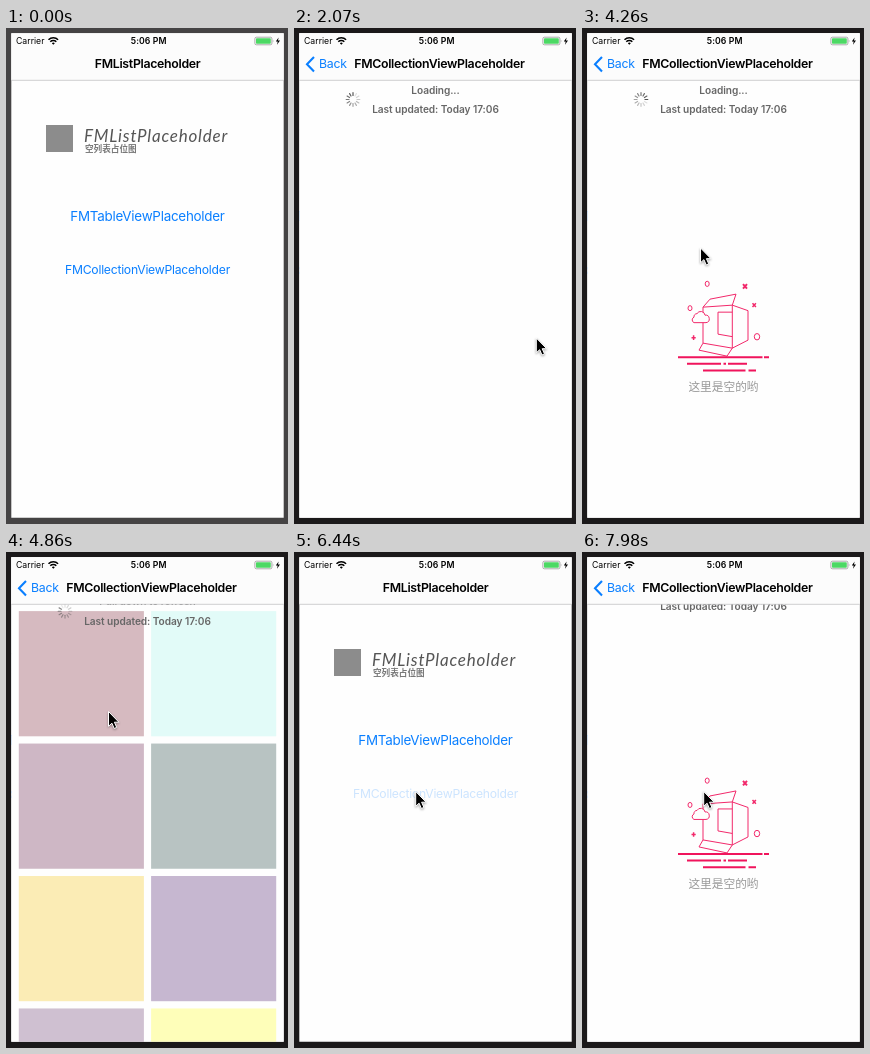
Animation of 282 by 496 pixels, one loop 8000 ms. Source, as an HTML page:

```html
<!DOCTYPE html>
<html lang="en">
<head>
<meta charset="utf-8">
<title>List placeholder demo</title>
<style>
  html, body { margin: 0; width: 100%; height: 100%; overflow: hidden; background: #fff; }
  svg { display: block; width: 282px; height: 496px; }
  text { font-family: Inter, "Liberation Sans", sans-serif; white-space: pre; }
  .mid { text-anchor: middle; }
  .title { font-size: 12.33px; font-weight: 600; letter-spacing: -.31px; }
  .link { fill: #0a7fff; letter-spacing: -.25px; }
  .status { font-size: 8.7px; }
  .note { font-size: 10.15px; font-weight: 600; fill: #666; letter-spacing: -.06px; }
  .cjk { font-family: "Noto Sans CJK SC", "Noto Sans CJK", "Noto Sans CJK JP", sans-serif; }
  .ink { fill: none; stroke: #f2296b; stroke-width: 1; stroke-linejoin: round; }
</style>
</head>
<body>
<svg viewBox="0 0 282 496">
  <defs>
    <clipPath id="screen"><rect x="5.3" y="5.3" width="272.4" height="484.4"/></clipPath>
    <linearGradient id="shade"><stop offset="0" stop-opacity="0"/><stop offset="1" stop-opacity=".14"/></linearGradient>
  </defs>
  <rect id="bezel" width="282" height="496"/>
  <g clip-path="url(#screen)">
    <rect width="282" height="496" fill="#fefefe"/>

    <g id="home">
      <rect x="40" y="97" width="27" height="27" fill="#8c8c8c"/>
      <text x="78" y="113.5" font-size="17" font-style="italic" fill="#555" letter-spacing=".8" style="font-family: Lato, sans-serif">FMListPlaceholder</text>
      <text class="cjk" x="79" y="124" font-size="8.6" font-weight="700" fill="#777">空列表占位图</text>
      <text class="mid link" x="141.5" y="192.7" font-size="13.4">FMTableViewPlaceholder</text>
      <text id="link" class="mid link" x="141.5" y="246.2" font-size="12.2">FMCollectionViewPlaceholder</text>
    </g>
    <rect id="dim" width="282" height="496"/>

    <g id="list">
      <rect x="-2" width="7" height="496" fill="url(#shade)"/>
      <rect x="5" width="273" height="496" fill="#fefefe"/>
      <g id="grid"></g>
      <g id="empty">
        <g class="ink">
          <path d="M121 240L150.300 238V281L121 276ZM150.300 238L166 243.500V273L150.300 281M121 240L128 232L154 227L150.300 238M121 276L117 283L145 289L150.300 281M150.300 245H136V267L150.300 269.500"/>
          <path fill="#fefefe" d="M112 255.500a3 3 0 0 1 0 -5.500a3 3 0 0 1 3 -3.500a4.300 4.300 0 0 1 8 1.500a3.600 3.600 0 0 1 1 7.500Z"/>
          <ellipse cx="125.200" cy="216.700" rx="2" ry="2.600"/>
          <ellipse cx="108" cy="241" rx="2" ry="2.500"/>
          <ellipse cx="175" cy="269.600" rx="2.700" ry="3.200"/>
          <path stroke-width="2" d="M161 217l4 4.400m0 -4.400l-4 4.400"/>
          <path stroke-width="1.500" d="M170.500 236l3.400 3.800m0 -3.800l-3.400 3.800M109.500 270.500h4.200m-2.100 -2.300v4.600"/>
          <path stroke="#f0145c" stroke-width="2" d="M96 290H180.500M182 290H187M105 296.500H139M141.500 296.500H144M146 296.500H165M121 303.300H163.500M166.500 303.300H174"/>
        </g>
        <text class="mid cjk" x="141.5" y="324" font-size="11.7" font-weight="300" fill="#999">这里是空的哟</text>
      </g>
      <g id="header">
        <text id="state" class="mid note" x="141.5" y="65.6"></text>
        <text class="mid note" x="141.5" y="85.2">Last updated: Today 17:06</text>
        <g id="spin" transform="translate(59 71.5)" stroke="#555" stroke-width="1.2" stroke-linecap="round"></g>
        <g id="arrow" fill="none" stroke="#999" stroke-width="2"><path d="M0 -13V12M-4.500 7L0 12.500L4.500 7"/></g>
      </g>
    </g>

    <rect y="0" width="282" height="52" fill="#fcfcfc"/>
    <path d="M0 52.300H282" stroke="#c4c4c6" stroke-width=".8"/>
    <text id="titleA" class="mid title" x="141.6" y="40.4">FMListPlaceholder</text>
    <text id="titleB" class="mid title" x="145.4" y="40.4">FMCollectionViewPlaceholder</text>
    <g id="back">
      <path d="M20 29L13 36.200L20 43.400" fill="none" stroke="#0a7fff" stroke-width="2.100"/>
      <text id="label" class="link" x="25" y="40.4" font-size="12.33">Back</text>
    </g>

    <text class="status" x="10" y="16.2">Carrier</text>
    <g fill="none" stroke="#000" stroke-width="1.5">
      <path d="M42.500 11.800a6.700 6.700 0 0 1 9.600 0M44.300 13.800a4.200 4.200 0 0 1 6 0"/>
      <path d="M47.300 16.800l-1.500 -1.500a2.100 2.100 0 0 1 3 0Z" fill="#000" stroke="none"/>
    </g>
    <text class="mid status" x="142.7" y="16.2" font-weight="600" letter-spacing=".1">5:06 PM</text>
    <rect x="248.900" y="9.200" width="17" height="7.600" rx="1.500" fill="none" stroke="#888" stroke-width=".7"/>
    <rect x="250" y="10.300" width="14.800" height="5.400" rx=".7" fill="#4cd964"/>
    <path d="M266.900 11.600v2.800q1 -1.400 0 -2.800Z" fill="#888"/>
    <path d="M272.600 9.400L269.800 13.500H271.700L271 16.800L274 12.400H272Z"/>
  </g>
  <path id="cursor" d="M0 0V14.800L3.400 11.700L5.700 17L8.200 15.900L5.900 10.700H10.400Z" stroke="#fff" stroke-width="1" stroke-linejoin="round" style="filter: drop-shadow(0 1px 1px rgba(0,0,0,.35))"/>
</svg>
<script>
const LOOP = 8000, PULL = 39.15;
const $ = id => document.getElementById(id);
const el = Object.fromEntries(
  ['bezel', 'home', 'link', 'dim', 'list', 'grid', 'empty', 'header', 'state', 'spin', 'arrow',
   'titleA', 'titleB', 'back', 'label', 'cursor'].map(id => [id, $(id)]));

const add = (parent, tag, attrs) => {
  const node = document.createElementNS('http://www.w3.org/2000/svg', tag);
  for (const k in attrs) node.setAttribute(k, attrs[k]);
  return parent.appendChild(node);
};
const move = (node, x, y) => node.setAttribute('transform', `translate(${x} ${y})`);
const fade = (node, a) => node.setAttribute('opacity', Math.max(0, Math.min(1, a)));

['#80293b', '#a7f5ea', '#661f4a', '#214540', '#f4c518', '#4c1f6e', '#6b3b70', '#fdff24'].forEach((fill, i) =>
  add(el.grid, 'rect', { x: 12.8 + i % 2 * 132.3, y: 59.1 + (i >> 1) * 132.45, width: 125.1, height: 125.2, fill }));

const spokes = Array.from({ length: 12 }, (_, i) =>
  add(el.spin, 'path', { d: 'M0 -4V-6.800', transform: `rotate(${i * 30})` }));

// progress of a step that begins at `from` and lasts `ms`
const part = (t, from, ms) => Math.max(0, Math.min(1, (t - from) / ms));
const ease = (t, from, ms) => (1 - Math.cos(Math.PI * part(t, from, ms))) / 2;
const slide = (t, from) => 1 - Math.pow(1 - part(t, from, 500), 3.6);

const LOADS = [[1570, 2730], [3710, 4710], [6570, 7730]];
const PRESS_LINK = [[1450, 1570], [6430, 6570]];
const PRESS_BACK = [[5560, 5750]];
const within = (t, spans) => spans.some(([a, b]) => t >= a && t < b);
const pressed = (t, spans) => Math.min(1, ...spans.map(([a, b]) => t < a ? 1 : .2 + .8 * ease(t, b, 250)));

const PATH = [
  [410, 284, 321], [900, 160, 257], [1050, 160, 257], [1300, 152, 249], [1600, 152, 249],
  [2060, 242.3, 310], [2750, 242.3, 310], [3350, 144.5, 238.5], [3510, 144.5, 238.5],
  [3710, 144.5, 318], [3800, 144.5, 318], [4600, 102.5, 159.5], [5160, 102.5, 159.5],
  [5540, 24.5, 32.8], [5800, 24.5, 32.8], [6380, 121.7, 239.5], [8000, 121.7, 239.5]
];

function pointer(t) {
  const i = Math.max(1, PATH.findIndex(p => p[0] > t));
  const [a, b] = [PATH[i - 1], PATH[i]];
  const p = ease(t, a[0], b[0] - a[0]);
  return [a[1] + (b[1] - a[1]) * p, a[2] + (b[2] - a[2]) * p];
}

function render(t) {
  const push = slide(t, 1570) - slide(t, 5750) + slide(t, 6570);
  const pull = PULL * (ease(t, 1630, 400) - ease(t, 2730, 400) + ease(t, 3510, 200)
    - ease(t, 4710, 400) + ease(t, 6630, 400) - ease(t, 7730, 400));
  const loading = within(t, LOADS);

  el.bezel.setAttribute('fill', t < 1450 ? '#454344' : '#1b191a');
  move(el.home, -82 * push, 0);
  fade(el.link, pressed(t, PRESS_LINK));
  fade(el.dim, .1 * push);
  move(el.list, 280 * (1 - push), 0);

  fade(el.grid, t < 6400 ? ease(t, 4710, 400) : 0);
  fade(el.empty, within(t, [[2730, 4710], [7730, LOOP]]) ? 1 : 0);
  move(el.empty, 0, pull);

  const release = !loading && t > 3510 && t < 3710 && pull > PULL * .95;
  move(el.header, 0, pull - PULL);
  fade(el.header, pull > .01 ? 1 : 0);
  el.state.textContent = loading ? 'Loading...' : release ? 'Release to refresh' : 'Pull down to refresh';
  const ended = Math.max(...LOADS.map(([, b]) => t >= b ? b : -LOOP));
  const spin = loading ? 1 : 1 - ease(t, ended, 400);
  fade(el.spin, spin);
  fade(el.arrow, spin > 0 ? 0 : 1);
  el.arrow.setAttribute('transform', `translate(59 71.5) rotate(${release ? 180 : 0})`);
  const head = Math.floor(t / 1000 * 12);
  spokes.forEach((s, i) => fade(s, 1 - .075 * (((head - i) % 12 + 12) % 12)));

  move(el.titleA, -90 * push, 0);
  fade(el.titleA, 1 - 1.4 * push);
  move(el.titleB, 100 * (1 - push), 0);
  fade(el.titleB, push);
  move(el.label, 60 * (1 - push), 0);
  fade(el.back, push * pressed(t, PRESS_BACK));

  fade(el.cursor, t < 410 ? 0 : 1);
  move(el.cursor, ...pointer(t));
}

const start = performance.now();
function tick() {
  render((performance.now() - start) % LOOP);
  requestAnimationFrame(tick);
}
tick();
</script>
</body>
</html>
```
